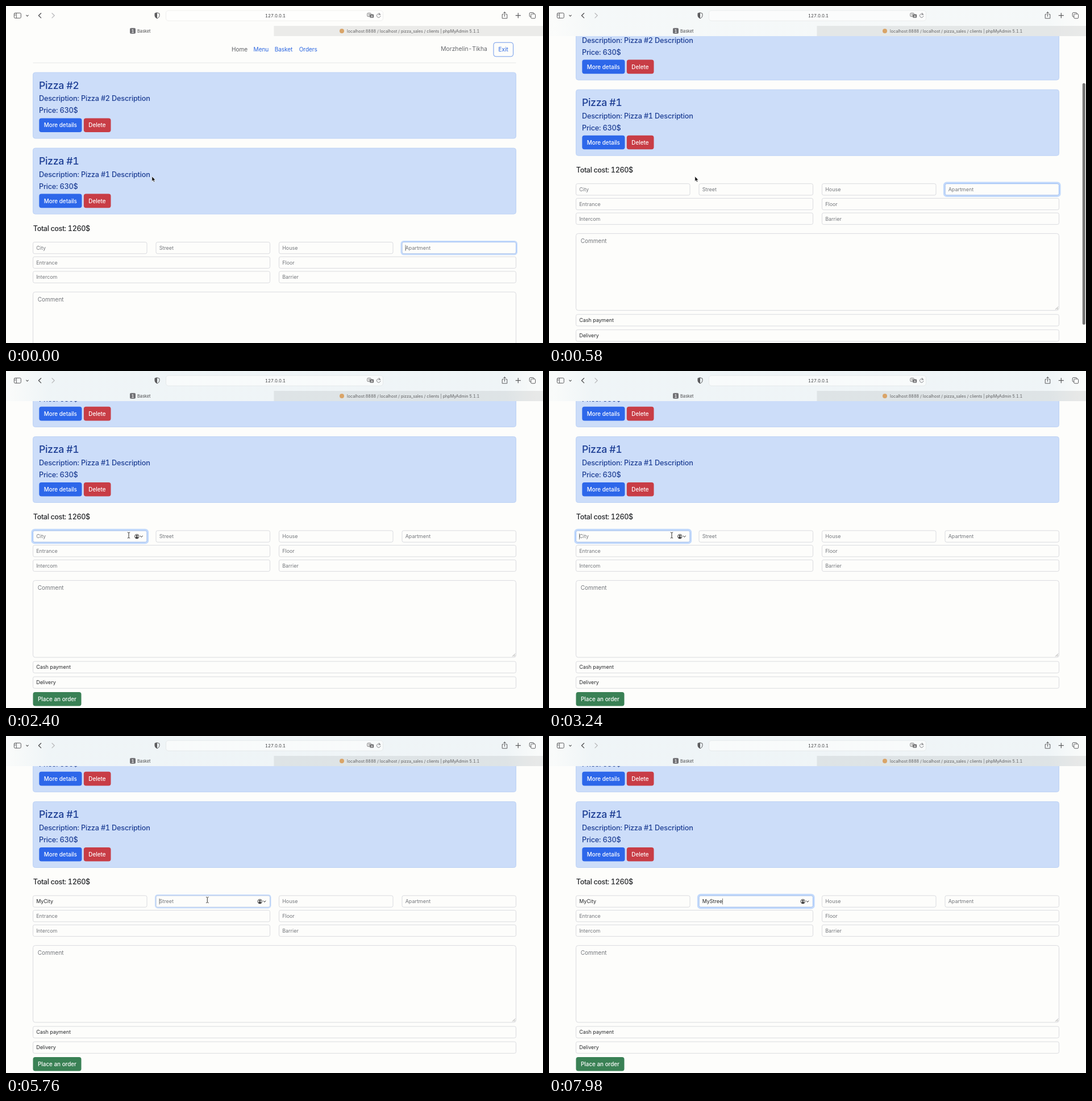
Write an HTML page that moves like this. It is 945x593 px and loops after 8 s.

```html
<!DOCTYPE html>
<html lang="en">
<head>
<meta charset="utf-8">
<title>Basket</title>
<style>
  html, body { margin: 0; width: 100%; height: 100%; overflow: hidden; background: #fdfdfb; }
  svg { display: block; width: 945px; height: 593px; }
  text { font-family: Inter, Roboto, sans-serif; font-variant-numeric: tabular-nums; white-space: pre; }
</style>
</head>
<body>
<svg id="stage" viewBox="0 0 945 593">
  <defs>
    <linearGradient id="haze">
      <stop offset=".01" stop-color="#e9f1f5" stop-opacity=".3"/>
      <stop offset=".08" stop-color="#e9f1f5"/>
      <stop offset=".93" stop-color="#e9f1f5"/>
      <stop offset=".99" stop-color="#e9f1f5" stop-opacity=".3"/>
    </linearGradient>
  </defs>
  <g id="page"></g>
  <rect id="thumb" x="938.8" width="5" height="425" rx="2.5" fill="#747474"/>
  <g id="chrome"></g>
  <g id="arrow"><path d="M0 0V8.8L2 7L3.3 10L4.9 9.3L3.6 6.4H6.2Z" fill="#111" stroke="#fff" stroke-width=".7"/></g>
  <g id="beam" fill="none" stroke="#333" stroke-width="1">
    <path d="M-2.2 -5Q-.3 -5 0 -4Q.3 -5 2.2 -5M0 -4V4M-2.2 5Q-.3 5 0 4Q.3 5 2.2 5"/>
  </g>
</svg>
<script>
const LOOP = 8000, MAX_SCROLL = 134.6;
const PAPER = '#fdfdfb', EDGE = '#dadbdf', BLUE = '#2b66e0', NAVY = '#1e3f95', INK = '#26282b', HINT = '#74777c';
const $ = id => document.getElementById(id);

function add(parent, tag, attrs, content) {
  const el = document.createElementNS('http://www.w3.org/2000/svg', tag);
  for (const key in attrs) el.setAttribute(key, attrs[key]);
  if (content !== undefined) el.textContent = content;
  parent.appendChild(el);
  return el;
}
const page = $('page'), chrome = $('chrome');

const rect = (parent, x, y, width, height, rx, fill, stroke = 'none') =>
  add(parent, 'rect', { x, y, width, height, rx, fill, stroke, 'stroke-width': 1 });
const label = (parent, x, y, str, size, fill, weight = 400, spacing = 0) =>
  add(parent, 'text', { x, y, 'font-size': size, fill, 'font-weight': weight, 'letter-spacing': spacing + 'em' }, str);
const line = (parent, d, stroke = '#5c5c5e', width = 1.1) =>
  add(parent, 'path', { d, fill: 'none', stroke, 'stroke-width': width, 'stroke-linecap': 'round', 'stroke-linejoin': 'round' });

function button(x, y, width, str, fill) {
  rect(page, x, y, width, 24.7, 4, fill);
  label(page, x + 8.5, y + 16, str, 9.85, '#fff', 500);
}

function card(y, title) {
  rect(page, 47.5, y, 850, 116, 4, '#ccddf9', '#bdd2f5');
  label(page, 58, y + 28.6, title, 17.7, NAVY, 500, -.02);
  label(page, 58, y + 50.4, `Description: ${title} Description`, 12.7, NAVY, 500, -.015);
  label(page, 58, y + 71.4, 'Price: 630$', 12.7, NAVY, 500, -.016);
  button(58.3, y + 80.4, 75.2, 'More details', '#2d67ea');
  button(136.8, y + 80.4, 47.7, 'Delete', '#c83d46');
}

function field(x, y, width, hint, color = HINT) {
  const ring = add(page, 'rect', { fill: 'none', stroke: '#0d6efd', 'stroke-opacity': .25 });
  rect(page, x, y, width, 20.3, 2.8, PAPER, EDGE);
  const edge = rect(page, x, y, width, 20.3, 2.8, 'none', '#98bdf8');
  const text = label(page, x + 5.7, y + 13.5, hint, 8.95, color);
  const caret = add(page, 'rect', { y: y + 5, width: .7, height: 10.5, fill: '#444' });
  const fill = add(page, 'g', { transform: `translate(${x + width - 17.7} ${y + 10.2})` });
  add(fill, 'circle', { r: 3.7, fill: 'none', stroke: '#1c1c1e', 'stroke-width': .9 });
  add(fill, 'circle', { cy: -.9, r: 1.4, fill: '#1c1c1e' });
  add(fill, 'path', { d: 'M-2.7 2.3Q0 -.6 2.7 2.3Q0 4.4 -2.7 2.3Z', fill: '#1c1c1e' });
  line(fill, 'M6 -.9L8.1 1.1L10.2 -.9', '#1c1c1e', 1);
  [ring, edge, caret, fill].forEach(el => el.setAttribute('opacity', 0));
  return { x, y, width, hint, ring, edge, text, caret, fill };
}

// Page content
for (const [x, str, color] of [[397, 'Home', '#5d5f63'], [435.6, 'Menu', BLUE], [472.7, 'Basket', BLUE], [515.7, 'Orders', BLUE]])
  label(page, x, 80.1, str, 10.1, color, 400, -.008);
label(page, 765.3, 79.3, 'Morzhelin-Tikha', 10.3, '#65676b');
rect(page, 858, 64.2, 34.6, 24.7, 4, 'none', '#6f99ea');
label(page, 866.4, 80.1, 'Exit', 10.1, BLUE);
rect(page, 47.5, 99.6, 850, .8, 0, '#dfe0e2');
card(117, 'Pizza #2');
card(250.1, 'Pizza #1');
label(page, 47.8, 395.5, 'Total cost: 1260$', 12.6, INK, 500, -.03);

const [city, street, , apartment] = ['City', 'Street', 'House', 'Apartment']
  .map((hint, i) => field(47.5 + i * 216.5, 415.5, 200.5, hint));
[['Entrance', 'Floor'], ['Intercom', 'Barrier']].forEach((pair, row) =>
  pair.forEach((hint, col) => field(47.5 + col * 433, 441.2 + row * 25.7, 417, hint)));

rect(page, 47.5, 503.2, 850, 135.3, 4, PAPER, EDGE);
label(page, 55.8, 519.5, 'Comment', 10, HINT);
line(page, 'M891.5 636.7L895.8 632.4M894.2 636.7L895.8 635.1', '#777', .7);
field(47.5, 645.6, 850, 'Cash payment', INK);
field(47.5, 672.6, 850, 'Delivery', INK);
button(47.5, 699.5, 85, 'Place an order', '#3a8155');

// Browser toolbar, hazed by the cards that scroll beneath it
rect(chrome, 0, 0, 945, 53, 0, PAPER);
const haze = rect(chrome, 0, 0, 945, 53, 0, 'url(#haze)');
rect(chrome, 471.5, 35, 474, 18, 0, 'rgba(0,0,0,.07)');
rect(chrome, 281.5, 8, 382, 18, 4.5, 'rgba(255,255,255,.6)', 'rgba(0,0,0,.06)');
rect(chrome, 14.3, 12.3, 12, 9, 1.8, 'none', '#5c5c5e');
line(chrome, 'M18.4 12.5V21M15.8 14.5H16.8M15.8 16.5H16.8', '#5c5c5e', .9);
line(chrome, 'M35.7 16.2L37.5 18L39.3 16.2');
line(chrome, 'M61.6 12.7L57.4 16.8L61.6 20.9', '#4e4e50', 1.3);
line(chrome, 'M81 12.7L85.2 16.8L81 20.9', '#bababc', 1.3);
line(chrome, 'M266 11.8L270 13.2V17.5Q269.7 20.2 266 22Q262.3 20.2 262 17.5V13.2Z', '#5c5c5e', 1);
add(chrome, 'path', { d: 'M266 11.8L262 13.2V17.5Q262.3 20.2 266 22Z', fill: '#5c5c5e' });
rect(chrome, 635.8, 12.5, 6.4, 6, 1.3, PAPER, '#7b7b7d');
rect(chrome, 640.3, 14.6, 6.8, 6.2, 1.3, '#6b6b6d');
label(chrome, 637.4, 17.4, 'x', 5, '#6b6b6d', 600);
label(chrome, 642, 19.6, 'A', 5, '#fff', 600);
line(chrome, 'M658.6 15.3A3.3 3.3 0 1 0 659 17.6M656.4 12.2L658.7 14.8L655.8 15.6', '#77777a', .9);
line(chrome, 'M875.3 14.7H873.2V21.8H881.8V14.7H879.7M877.5 18.3V10.6M875.3 12.6L877.5 10.4L879.7 12.6', '#5c5c5e', 1);
line(chrome, 'M901.3 12.6V20.8M897.2 16.7H905.4', '#5c5c5e', 1.2);
rect(chrome, 921.2, 11.6, 7.8, 7.4, 1.6, 'none', '#5c5c5e');
rect(chrome, 923.8, 14, 7.8, 7.8, 1.6, PAPER, '#5c5c5e');
label(chrome, 456, 20.1, '127.0.0.1', 7.7, '#3f3f41');
rect(chrome, 218, 38.8, 10, 10, 2, '#707074');
label(chrome, 220.8, 46.5, '1', 7, '#fff', 600);
label(chrome, 231, 46.5, 'Basket', 7.35, '#4b4b4d');
add(chrome, 'circle', { cx: 591, cy: 44, r: 4, fill: '#d9a468' });
label(chrome, 600, 46.5, 'localhost:8888 / localhost / pizza_sales / clients | phpMyAdmin 5.1.1', 7.2, '#5f5f61');

// Focus intervals and the moments at which each character arrives
const inputs = [
  { box: apartment, from: -100, to: 1850, word: '', keys: [] },
  { box: city, from: 1850, to: 5680, word: 'MyCity', keys: [3400, 3700, 4000, 4350, 4580, 4800], autofill: true },
  { box: street, from: 5680, to: 9000, word: 'MyStree', keys: [6350, 6600, 6950, 7200, 7450, 7700, 7920], autofill: true }
];
const mouse = [[0, 256.8, 299.8], [1000, 256.8, 299.8], [1360, 216, 289], [5150, 216, 289], [5600, 354.3, 288.5], [LOOP, 354.3, 288.5]];
const hidden = [[3400, 5130], [6350, LOOP]];

const clamp = v => Math.max(0, Math.min(1, v));
const ramp = (t, from, to) => clamp((t - from) / (to - from));
const smooth = p => p * p * (3 - 2 * p);

function mouseAt(t) {
  const i = Math.max(1, mouse.findIndex(step => step[0] > t));
  const [t0, x0, y0] = mouse[i - 1], [t1, x1, y1] = mouse[i];
  const p = smooth(ramp(t, t0, t1));
  return [x0 + (x1 - x0) * p, y0 + (y1 - y0) * p];
}

function drawInput({ box, from, to, word, keys, autofill }, t) {
  const active = t >= from && t < to;
  const glow = smooth(ramp(t, from, from + 150)) * (1 - smooth(ramp(t, to, to + 80)));
  const typed = keys.filter(k => k <= t);
  const value = word.slice(0, typed.length);
  box.text.textContent = value || box.hint;
  box.text.setAttribute('fill', value ? INK : HINT);

  const w = 2.6 * glow, out = .5 + w / 2;
  const shape = { x: box.x - out, y: box.y - out, width: box.width + 2 * out, height: 20.3 + 2 * out, rx: 2.8 + out, 'stroke-width': w, opacity: glow > 0 ? 1 : 0 };
  for (const key in shape) box.ring.setAttribute(key, shape[key]);
  box.edge.setAttribute('opacity', glow);
  box.fill.setAttribute('opacity', active && autofill ? 1 : 0);

  const since = t - (typed.length ? typed[typed.length - 1] : from);
  box.caret.setAttribute('opacity', active && since % 1000 < 500 ? 1 : 0);
  box.caret.setAttribute('x', box.x + 5.7 + (value ? box.text.getComputedTextLength() : 0));
}

function render(t) {
  const scroll = MAX_SCROLL * (1 - Math.pow(1 - ramp(t, 20, 1000), 1.7));
  page.setAttribute('transform', `translate(0 ${-scroll})`);
  haze.setAttribute('opacity', .7 * ramp(scroll, 60, MAX_SCROLL));
  $('thumb').setAttribute('y', 54 + scroll * .795);
  $('thumb').setAttribute('opacity', ramp(t, 20, 80) * (1 - ramp(t, 1560, 1800)));
  inputs.forEach(input => drawInput(input, t));

  const [x, y] = mouseAt(t);
  const shown = !hidden.some(([a, b]) => t >= a && t < b);
  const top = city.y - scroll;
  const over = y > top && y < top + 20.3 && [city, street].some(f => x > f.x && x < f.x + f.width);
  for (const [id, on] of [['arrow', !over], ['beam', over]]) {
    $(id).setAttribute('transform', `translate(${x} ${y})`);
    $(id).setAttribute('opacity', shown && on ? 1 : 0);
  }
}

const start = performance.now();
(function tick() {
  render((performance.now() - start) % LOOP);
  requestAnimationFrame(tick);
})();
</script>
</body>
</html>
```
